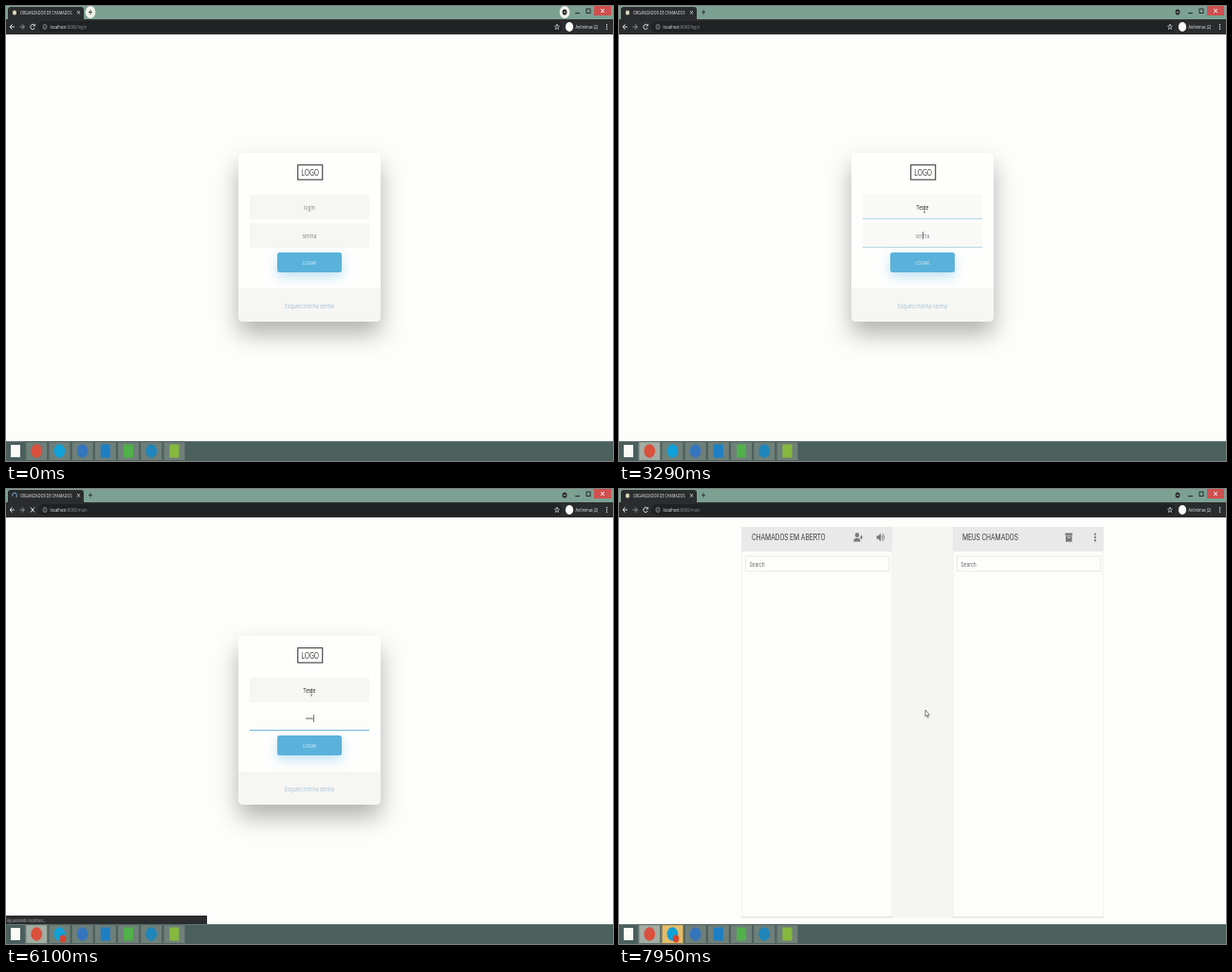
These frames come from a looping animation (640 px wide and 480 px high, 8000 ms). An HTML page with a canvas:

```html
<!DOCTYPE html>
<html lang="pt-BR">
<head>
<meta charset="utf-8">
<title>Organizador de chamados</title>
<style>
html, body { margin: 0; width: 100%; height: 100%; overflow: hidden; background: #fdfdfb; }
canvas { display: block; width: 100vw; height: 100vh; }
</style>
</head>
<body>
<canvas id="stage" width="640" height="480"></canvas>
<script>
const ctx = document.getElementById('stage').getContext('2d');
const LOOP = 8000;
const SQUEEZE = 0.75; // a 16:9 desktop shown at 4:3
const UI = '"Open Sans", sans-serif';
const MATERIAL = 'Roboto, sans-serif';
const PAGE = '#fdfdfb', FIELD = '#f6f6f3', HEADER = '#e8e9e8';
const DARK = '#2a2c2e', LIGHT = '#f0f1f0';

const FOCUS_LOGIN = 1620, FOCUS_PASSWORD = 3040, BADGE = 4080;
const SUBMIT = 5110, STATUS = 5250, MAIN_PAGE = 6620, BLINK = 530;
const LOGIN_KEYS = [1950, 2200, 2430, 2640, 2840];
const PASSWORD_KEYS = [3430, 3590, 3740, 3900];
const CURSOR = [[30, 636, 474], [1450, 322, 211], [1620, 322, 211],
  [1750, 322, 215], [6620, 322, 215], [7170, 314, 233], [7480, 323, 233]];

const smooth = (t, start, length) => {
  const p = Math.min(1, Math.max(0, (t - start) / length));
  return p * p * (3 - 2 * p);
};
const typed = (keys, t) => keys.filter(k => k <= t).length;

function rect(x, y, w, h, color) {
  ctx.fillStyle = color;
  ctx.fillRect(x, y, w, h);
}

function frame(x, y, w, h, color, width = 1) {
  ctx.strokeStyle = color;
  ctx.lineWidth = width;
  ctx.strokeRect(x, y, w, h);
}

function round(x, y, w, h, radii, color) {
  ctx.fillStyle = color;
  ctx.beginPath();
  ctx.roundRect(x, y, w, h, radii);
  ctx.fill();
}

function dot(x, y, r, color) {
  ctx.fillStyle = color;
  ctx.beginPath();
  ctx.ellipse(x, y, r * 0.82, r, 0, 0, 7);
  ctx.fill();
}

function shape(x, y, path, color, width = 0) {
  ctx.save();
  ctx.translate(x, y);
  const p = new Path2D(path);
  if (width) {
    ctx.strokeStyle = color;
    ctx.lineWidth = width;
    ctx.stroke(p);
  } else {
    ctx.fillStyle = color;
    ctx.fill(p);
  }
  ctx.restore();
}

// Draws text centred vertically on y and returns its width on the stage.
function text(str, x, y, size, color, align = 'left', font = UI) {
  ctx.save();
  ctx.translate(x, y);
  ctx.scale(SQUEEZE, 1);
  ctx.font = `${size}px ${font}`;
  ctx.textAlign = align;
  ctx.textBaseline = 'alphabetic';
  ctx.fillStyle = color;
  ctx.fillText(str, 0, size * 0.36);
  const width = ctx.measureText(str).width * SQUEEZE;
  ctx.restore();
  return width;
}

function withShadow(color, blur, dy, draw) {
  ctx.save();
  ctx.shadowColor = color;
  ctx.shadowBlur = blur;
  ctx.shadowOffsetY = dy;
  draw();
  ctx.restore();
}

function drawBrowser(t) {
  const loading = t >= SUBMIT && t < MAIN_PAGE;
  rect(0, 0, 640, 14, '#7ca193');
  round(2, 1, 80, 14, [3, 3, 0, 0], DARK);
  if (loading) {
    const a = t / 130;
    ctx.strokeStyle = '#7fb0d8';
    ctx.lineWidth = 1;
    ctx.beginPath();
    ctx.ellipse(9, 7, 2.4, 3, 0, a, a + 4);
    ctx.stroke();
  } else {
    dot(9, 7, 2.6, '#d8d6b8');
  }
  text('ORGANIZADOR DE CHAMADOS', 15, 6.8, 5, LIGHT);
  shape(76.5, 6.8, 'M-1.3-1.7L1.3 1.7M1.3-1.7L-1.3 1.7', LIGHT, 0.7);

  if (t < FOCUS_LOGIN) {
    dot(89, 6.5, 6.5, '#f2f3ea');
    dot(589, 6.5, 6.5, '#f2f3ea');
  }
  shape(89, 6.5, 'M-2 0H2M0-2.6V2.6', DARK, 0.8);
  dot(589, 6.5, 2.9, DARK);
  shape(589, 6.5, 'M-1-.5H1L0 1Z', '#dfe5df');

  shape(602.5, 7.5, 'M-2.3 0H2.3', DARK, 1.2);
  frame(612, 3, 4, 4.5, DARK, 1);
  rect(620, 0, 18, 10, '#d0504f');
  shape(629, 5, 'M-1.7-2L1.7 2M1.7-2L-1.7 2', '#fff', 1);

  rect(0, 14, 640, 16, DARK);
  round(34, 16, 552, 12, 6, '#1f2123');
  shape(6.5, 22, 'M2.5 0H-2.3M0-2.7L-2.3 0L0 2.7', LIGHT, 0.9);
  shape(17, 22, 'M-2.5 0H2.3M0-2.7L2.3 0L0 2.7', '#9b9d9c', 0.9);
  if (loading) shape(28, 22, 'M-2-2.5L2 2.5M2-2.5L-2 2.5', LIGHT, 0.9);
  else shape(28, 22, 'M1.8-1.7A2.2 2.7 0 1 0 2.1 1M2.3-3V-1H.5', LIGHT, 0.9);
  shape(41, 22, 'M-2 0A2 2.6 0 1 1 2 0A2 2.6 0 1 1-2 0M0-.4V1.5M0-1.5V-1', '#b4b6b4', 0.6);
  const host = text('localhost', 46.5, 22, 5.5, LIGHT);
  text(t < SUBMIT ? ':8080/login' : ':8080/main', 46.5 + host, 22, 5.5, '#929594');
  shape(581, 22, 'M0-3L.7-.9H2.4L1.1.5L1.6 2.6L0 1.4L-1.6 2.6L-1.1.5L-2.4-.9H-.7Z', LIGHT, 0.6);
  dot(594, 22, 5, '#fcfcf8');
  text('Anônimas (2)', 600.5, 22, 5.2, LIGHT);
  for (const dy of [-2.2, 0, 2.2]) dot(633.5, 22 + dy, 0.8, LIGHT);
}

function drawTaskbar(t) {
  rect(0, 459, 640, 21, '#4b5f5d');
  rect(0, 459, 640, 0.8, '#6c7d78');
  rect(5, 463, 10, 13, '#fafaf6');
  const icons = ['#d9503c', '#12a0d8', '#3575be', '#1c80c4', '#52b04a', '#1e86bb', '#86b83e'];
  icons.forEach((color, i) => {
    const x = 20.5 + 24.2 * i, cx = x + 11.7;
    rect(x, 459.5, 23.4, 20.5, '#6f7f79');
    if (i === 0 && t >= FOCUS_LOGIN) rect(x, 459.5, 23.4, 20.5, '#a3ada4');
    if (i === 1) {
      ctx.globalAlpha = smooth(t, 7780, 170);
      rect(x, 459.5, 23.4, 20.5, '#e6bd68');
      ctx.globalAlpha = 1;
    }
    frame(x + 0.4, 459.8, 22.8, 19.8, '#465854', 0.7);
    if ([3, 4, 6].includes(i)) rect(cx - 5, 462.5, 10, 14, color);
    else dot(cx, 469.5, 7.2, color);
  });
  if (t >= BADGE) dot(60, 474.5, 4, '#d8432f');
}

function drawField(y, value, placeholder, focus, caretOn) {
  rect(257, y, 126, 26, FIELD);
  ctx.globalAlpha = focus;
  rect(257, y, 126, 25, PAGE);
  rect(257, y + 25, 126, 0.9, '#66b4d8');
  ctx.globalAlpha = 1;
  const cy = y + 13;
  const width = text(value || placeholder, 320, cy, 7, value ? '#2c2c2c' : '#85868a', 'center');
  if (caretOn) rect(value ? 320.3 + width / 2 : 320, cy - 4, 0.6, 8, '#2c2c2c');
}

function drawLogin(t) {
  withShadow('rgba(0, 0, 0, .3)', 25, 13, () => round(245, 155, 150, 178, [4, 4, 5, 5], '#fefefd'));
  round(245, 298, 150, 35, [0, 0, 5, 5], FIELD);

  frame(307.7, 167.7, 26, 15.5, '#3e3f3e', 1.1);
  text('LOGO', 320.7, 175.7, 9, '#343534', 'center');

  const inPassword = t >= FOCUS_PASSWORD;
  const lastInput = Math.max(...[FOCUS_LOGIN, FOCUS_PASSWORD, ...LOGIN_KEYS, ...PASSWORD_KEYS]
    .filter(k => k <= t));
  const caretOn = t >= SUBMIT || Math.floor((t - lastInput) / BLINK) % 2 === 0;
  const passwordFocus = smooth(t, FOCUS_PASSWORD, 500);
  const loginFocus = smooth(t, FOCUS_LOGIN, 500) - passwordFocus;
  drawField(199, 'Teste'.slice(0, typed(LOGIN_KEYS, t)), 'login', loginFocus,
    caretOn && t >= FOCUS_LOGIN && !inPassword);
  drawField(229, '•'.repeat(typed(PASSWORD_KEYS, t)), 'senha', passwordFocus, caretOn && inPassword);

  withShadow('rgba(95, 186, 233, .4)', 12, 4.5, () => round(286, 260, 68, 21, 2.5, '#5ab2da'));
  text('LOGAR', 320, 270.5, 5.7, '#e8f4fa', 'center');
  text('Esqueci minha senha', 320, 316, 7, '#a0bfd4', 'center');

  if (t >= STATUS) {
    rect(0, 450, 212, 9.5, DARK);
    text('Aguardando localhost...', 1, 455, 5, '#b8bab8');
  }
}

function drawPanel(x, titleX, title) {
  rect(x, 40, 159, 412, PAGE);
  frame(x + 0.5, 40.5, 158, 411.5, '#f1f1ee', 0.8);
  rect(x, 40, 159, 26, HEADER);
  rect(x, 451.3, 159, 1, '#dcdedb');
  text(title, titleX, 51, 9.3, '#404244', 'left', MATERIAL);
  frame(x + 4.5, 71, 151.5, 15.8, '#e9e9df', 0.9);
  text('Search', x + 8.5, 79, 7, '#747676', 'left', MATERIAL);
}

function drawMain() {
  const ink = '#77797a';
  rect(288, 40, 64, 412, '#f5f5f2');
  drawPanel(129, 140, 'CHAMADOS EM ABERTO');
  drawPanel(352, 362, 'MEUS CHAMADOS');
  dot(251, 48.5, 2.6, ink);
  shape(251, 51, 'M-3.6 4.5V3Q-3 .8 0 .8Q3 .8 3.4 3V4.5Z', ink);
  shape(255.5, 51, 'M-1.6 0H1.6M0-2.2V2.2', ink, 1);
  shape(275, 51, 'M-3.3-1.7H-1.4L1-4.5V4.5L-1.4 1.7H-3.3Z', ink);
  shape(275, 51, 'M2-2Q3.3 0 2 2M2.6-4Q6.6 0 2.6 4', ink, 0.9);
  rect(470.5, 46.5, 7.6, 2.4, ink);
  rect(471, 49.5, 6.6, 6.2, ink);
  rect(473, 50.8, 2.6, 1, HEADER);
  for (const dy of [-3.2, 0, 3.2]) dot(502, 51 + dy, 1.2, ink);
}

function cursorAt(t) {
  const next = CURSOR.findIndex(k => k[0] > t);
  if (next < 0) return CURSOR[CURSOR.length - 1].slice(1);
  const [t0, x0, y0] = CURSOR[next - 1], [t1, x1, y1] = CURSOR[next];
  const p = smooth(t, t0, t1 - t0);
  return [x0 + (x1 - x0) * p, y0 + (y1 - y0) * p];
}

function drawCursor(t) {
  if (t < CURSOR[0][0]) return;
  const [x, y] = cursorAt(t);
  const overField = t < MAIN_PAGE && x > 257 && x < 383 && y > 199 && y < 225;
  if (overField) {
    shape(x, y, 'M-1.1-3H1.1M0-3V3M-1.1 3H1.1', '#55575a', 0.6);
  } else {
    const arrow = 'M0 0V7L1.4 5.7L2.4 8.2L3.4 7.7L2.5 5.3H4.3Z';
    shape(x, y, arrow, '#fff');
    shape(x, y, arrow, '#4c4e50', 0.7);
  }
}

function draw(now) {
  const t = now % LOOP;
  rect(0, 0, 640, 480, PAGE);
  if (t < MAIN_PAGE) drawLogin(t);
  else drawMain();
  drawBrowser(t);
  drawTaskbar(t);
  drawCursor(t);
}

let start;
function tick(now) {
  start ??= now;
  draw(now - start);
  requestAnimationFrame(tick);
}
draw(0);
requestAnimationFrame(tick);
</script>
</body>
</html>
```
